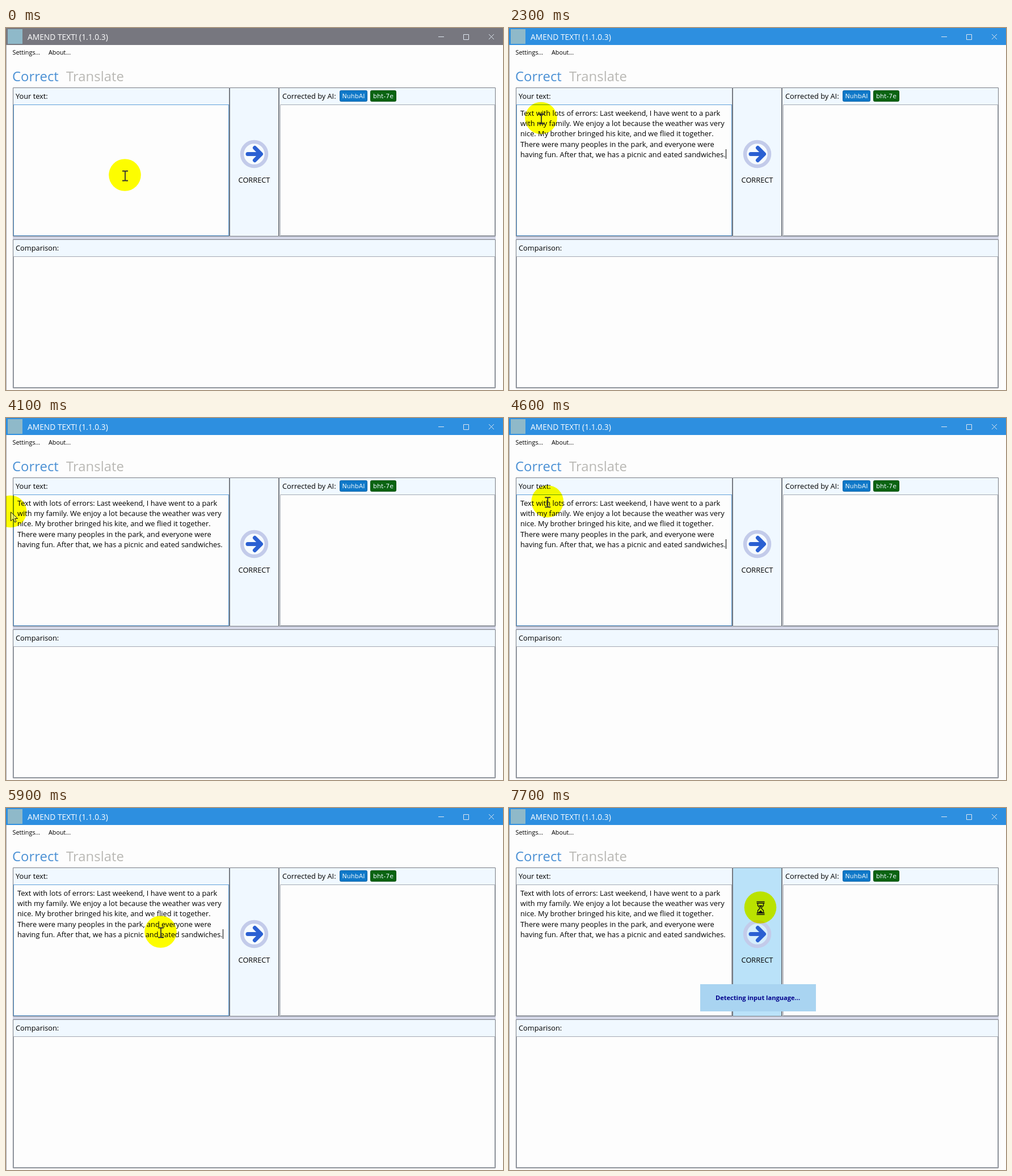
Write an HTML page that moves like this. It is 876 px wide and 639 px high and loops after 8 s.

```html
<!DOCTYPE html>
<html lang="en">
<head>
<meta charset="utf-8">
<title>Text corrector</title>
<style>
  html, body { margin: 0; width: 100%; height: 100%; overflow: hidden; background: #fdfdfd; }
  svg { display: block; }
  text { font: 12.8px "Open Sans", sans-serif; fill: #000; white-space: pre; }
  .title { font-size: 13.8px; fill: #fff; }
  .menu { font-size: 10.8px; }
  .tab { font-size: 23.9px; fill: #4a90d4; }
  .off { fill: #b9b8b4; }
  .badge { font: 11px "DejaVu Sans", sans-serif; fill: #e8f4fb; }
  .notice { font-size: 11.1px; font-weight: 700; fill: #00008b; }
  .mid { text-anchor: middle; }
  .head { fill: #f0f8ff; }
  .line { fill: none; stroke: #777b82; }
  .thin { fill: none; stroke: #a3a9b2; }
  #highlight { fill: #ff0; mix-blend-mode: multiply; }
</style>
</head>
<body>
<svg width="876" height="639" viewBox="0 0 876 639">
  <rect width="876" height="639" fill="#fdfdfd"/>
  <path d="M.5 30V639" stroke="#a4a4a8"/>
  <rect id="bar" width="876" height="30"/>
  <rect x="3" y="2" width="26" height="26" fill="#8fb9c9"/>
  <text class="title" x="38" y="21">AMEND TEXT! (1.1.0.3)</text>
  <path d="M762 15.5h10M806.5 11.5h9v9h-9zM851 11l9 9m0-9l-9 9" fill="none" stroke="#dfe7f0"/>
  <text class="menu" x="11.5" y="47">Settings...</text>
  <text class="menu" x="75" y="47">About...</text>
  <text class="tab" x="11" y="94">Correct</text>
  <text class="tab off" x="106" y="94">Translate</text>

  <path class="head" d="M12 105h382v30H12zM482 105h381v30H482zM12 373h851v30H12z"/>
  <rect x="12" y="368" width="851" height="5" fill="#d3d6e6"/>
  <rect id="button" x="395" y="105" width="87" height="263"/>
  <path class="thin" d="M483.5 135.500h378v231h-378zM13.500 403.500h848v231h-848z"/>
  <rect id="field" x="13.5" y="135.5" width="379" height="231" fill="none"/>
  <path class="line" d="M12.500 105.500h381v262h-381zM394.500 105.500h86v262h-86zM481.500 105.500h381v262h-381zM12.500 373.500h850v262h-850z"/>

  <text x="17" y="125">Your text:</text>
  <text x="487" y="125">Corrected by AI:</text>
  <text x="17" y="393">Comparison:</text>
  <rect x="588.5" y="110.5" width="48" height="19" rx="2" fill="#0f78c8" stroke="#0b62a6"/>
  <rect x="642.5" y="110.5" width="45" height="19" rx="2" fill="#0b6412" stroke="#08500e"/>
  <text class="badge mid" x="612.5" y="124">NuhbAI</text>
  <text class="badge mid" x="665" y="124">bht-7e</text>

  <circle cx="437.5" cy="222.5" r="21.5" fill="#fff" fill-opacity=".4" stroke="#c3cbea" stroke-width="6.5"/>
  <path d="M426 222.5H449M438.5 211.500L449.500 222.500L438.500 233.500" fill="none" stroke="#2b60d2" stroke-width="7" stroke-linecap="round" stroke-linejoin="round"/>
  <text class="mid" x="437.5" y="273">CORRECT</text>

  <g id="message"></g>
  <path id="caret" stroke="#000"/>
  <g id="notice">
    <rect x="337" y="311" width="204" height="48" fill="#a9d4f1"/>
    <text class="notice mid" x="438.5" y="339">Detecting input language...</text>
  </g>

  <circle id="highlight" r="28.3"/>
  <g id="pointer">
    <path id="beam" d="M-5-8h4l1 1 1-1h4M0-7V8M-5 9h4l1-1 1 1h4" fill="none" stroke="#333" stroke-width="1.8"/>
    <path id="arrow" d="M0 0V16l4-4 3 6 2.5-1L7 11.5h5z" fill="#fff" fill-opacity=".35" stroke="#111"/>
    <g id="wait" fill="none" stroke="#111" stroke-width="1.4">
      <path d="M-7-11H7M-7-8.5H7M-7 9H7M-7 11.5H7M-5-8v4l4 4-4 4.500v4M5-8v4L1 0l4 4.500v4"/>
      <path d="M-3 8l3-3 3 3zM-2-4h4L0-2z" fill="#111"/>
    </g>
    <circle id="ring" fill="none" stroke="#e8141c" stroke-width="2.6"/>
  </g>
</svg>
<script>
const LOOP = 8000, STEP = 100, BLINK = 530;
const ACTIVE = 1100, PASTE = 2300, PRESS = 7400, BUSY = 7600;
const clicks = [1000, PRESS];
const lines = [
  'Text with lots of errors: Last weekend, I have went to a park',
  'with my family. We enjoy a lot because the weather was very',
  'nice. My brother bringed his kite, and we flied it together.',
  'There were many peoples in the park, and everyone were',
  'having fun. After that, we has a picnic and eated sandwiches.'
];
// Pointer route: time, x, y
const route = [
  [0, 209.5, 259.5], [900, 56.5, 159], [2300, 56.5, 159], [3200, 48, 154],
  [3600, 29, 149], [4100, 8, 165], [4500, 50, 150], [4900, 121, 139],
  [5100, 152.5, 147], [5800, 261, 212], [5900, 272.5, 218.5],
  [6400, 405, 273], [6700, 439, 288], [7200, 443, 175.5], [LOOP, 443, 175.5]
];
const el = id => document.getElementById(id);
const show = (id, on) => el(id).setAttribute('visibility', on ? 'visible' : 'hidden');
const paint = (id, name, value) => el(id).setAttribute(name, value);

el('message').innerHTML = lines
  .map((line, i) => `<text x="20" y="${Math.round(155 + i * 18.2)}">${line}</text>`).join('');

function pointerAt(t) {
  const i = route.findIndex(p => p[0] > t);
  const [t0, x0, y0] = route[i - 1], [t1, x1, y1] = route[i];
  let k = (t - t0) / (t1 - t0);
  if (i === 1) k = k * k * (3 - 2 * k);
  return [x0 + (x1 - x0) * k, y0 + (y1 - y0) * k];
}

function draw(t) {
  const [x, y] = pointerAt(t);
  const pasted = t >= PASTE, busy = t >= BUSY, pressed = t >= PRESS;
  const overButton = x > 395;

  paint('bar', 'fill', t < ACTIVE ? '#77777f' : '#2d8fe0');
  paint('button', 'fill', overButton ? '#bae2f9' : '#f0f8ff');
  paint('field', 'stroke', pressed ? '#a3a9b2' : '#5f9fda');
  show('message', pasted);
  show('notice', busy);

  const since = t - (pasted ? PASTE : ACTIVE - 50);
  show('caret', since >= 0 && !pressed && Math.floor(since / BLINK) % 2 === 0);
  paint('caret', 'd', pasted ? 'M382.5 214v17' : 'M20.5 142v17');

  paint('highlight', 'transform', `translate(${x} ${y})`);
  paint('pointer', 'transform', `translate(${x + .5} ${y + 1})`);
  const overField = x > 13 && !overButton;
  show('beam', overField);
  show('arrow', !overField && !busy);
  show('wait', busy);

  const age = Math.min(...clicks.map(c => t < c ? Infinity : t - c));
  show('ring', age < 200);
  if (age < 200) paint('ring', 'r', 6 + age * .06);
}

function tick(now) {
  draw(Math.floor(now % LOOP / STEP) * STEP);
  requestAnimationFrame(tick);
}
draw(0);
requestAnimationFrame(tick);
</script>
</body>
</html>
```
